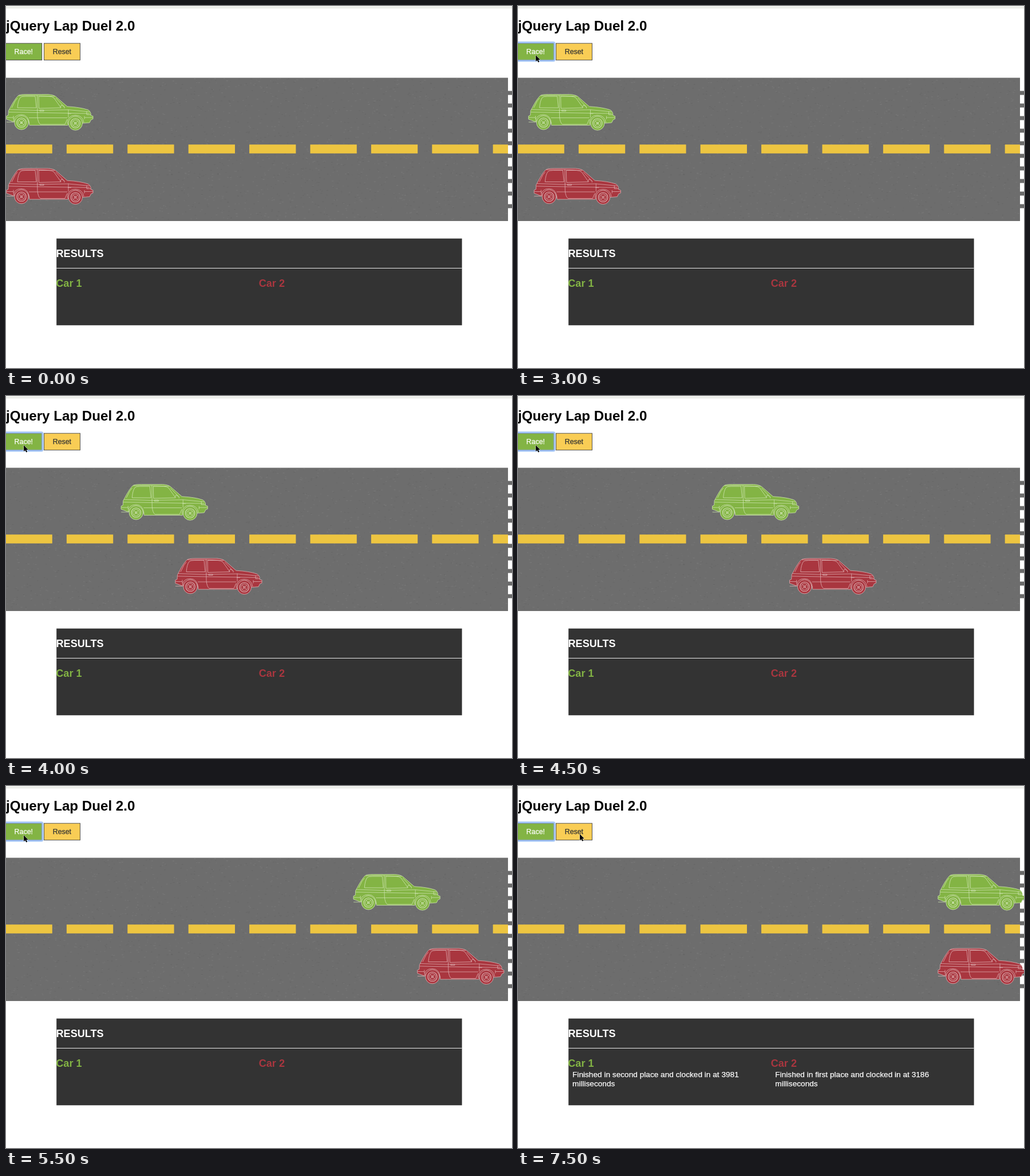
Animation, 884 px wide and 633 px high, one loop 8000 ms. Source, as an HTML page:

```html
<!DOCTYPE html>
<html lang="en">
<head>
<meta charset="utf-8">
<title>jQuery Lap Duel 2.0</title>
<style>
  html, body { margin: 0; width: 100%; height: 100%; overflow: hidden; background: #fff; }
  svg { display: block; width: 884px; height: 633px; }
  text { font-family: "Liberation Sans", Arial, Helvetica, sans-serif; }
  .title { font-size: 24.15px; font-weight: bold; }
  .btn { font-size: 12.4px; stroke-width: .25px; }
  .head { font-size: 18.1px; font-weight: bold; }
  .info { font-size: 13.67px; fill: #fff; stroke: #fff; stroke-width: .25px; }
  .green { --paint: #83b444; --line: #cfe4b2; }
  .red { --paint: #a9363f; --line: #dfb0b3; }
  .head.green, .head.red { fill: var(--paint); }
</style>
</head>
<body>
<svg viewBox="0 0 884 633">
  <defs>
    <g id="wheel">
      <circle r="12.2" fill="var(--paint)"/>
      <circle r="8.2" stroke-width="1.1"/>
      <circle r="5.8"/>
      <circle r="1.8"/>
      <path d="M-4-4 4 4M-4 4 4-4" stroke-width=".8"/>
    </g>
    <g id="car" fill="none" stroke="var(--line)" stroke-width=".8" stroke-linejoin="round">
      <path fill="var(--paint)" d="M4.500 183 7 178.500Q15 163 21 157 23 154.500 36 154.500L73 154.500Q82 155 86.500 158L107 175.700Q130 177 143 181.500 148.500 184 148.500 191.500L152 192.500V197.500L148.500 199 146 204 134 205Q131 193 121 193 111 194 108 208.500H41Q39 193 27 192 17 193 14 203L5 199.500 .8 198V192.500L4 191Z"/>
      <path d="M20 178Q21 165 25 160 26.500 158 34 158L51 158 53 178ZM57 158H75Q81 158 84 161L96 178 57.500 179ZM54.500 156 55 194Q56 204 60 207H103L107 198M22 157Q42 155.500 85 158M87 161 102 176.500"/>
      <path d="M6 181 52 182.500 109 181.500 146 185M5 185.500 55 186.500 146 188M1 195H13M40 195.500H107M137 195H152M13 192V198M137 192.500V198M109 181V195M1 203H13" stroke-width=".75"/>
      <path d="M13 202Q14 190 27 190 39 190 41 206M107 206Q108 191 121 191 134 191 136 204M141 184.500V190H148M59 182H66V184H59ZM95 177 97 173 102 176.500V179M108 188H114M10 178 16 166 20 161"/>
      <use href="#wheel" x="27" y="204"/>
      <use href="#wheel" x="121.300" y="205"/>
    </g>
  </defs>

  <rect width="884" height="3" fill="#f2f3f0"/>
  <rect y="3" width="884" height="1" fill="#dfe0dc"/>
  <text class="title" x="0" y="42.500">jQuery Lap Duel 2.0</text>

  <g stroke="#444" stroke-width=".9">
    <rect x="-.5" y="65.200" width="63.200" height="29.400" fill="#83b444"/>
    <rect x="66.500" y="65.200" width="63" height="29.400" fill="#f9cd55"/>
  </g>
  <g id="ring" fill="none" stroke="#a0c4f7">
    <rect x="-6" y="63.800" width="69.800" height="31.900" rx="2" stroke-width="4.400" opacity=".35"/>
    <rect x="-6" y="63.800" width="69.800" height="31.900" rx="2" stroke-width="2.400"/>
  </g>
  <text class="btn" x="14.600" y="84" fill="#fff" stroke="#fff">Race!</text>
  <text class="btn" x="81.700" y="84" fill="#333" stroke="#333">Reset</text>

  <rect y="125.500" width="877" height="250.500" fill="#6d6d6d"/>
  <path id="dark" fill="#000" opacity=".055"/>
  <path id="light" fill="#fff" opacity=".055"/>
  <path d="M-.5 250H877" stroke="#edc541" stroke-width="15.500" stroke-dasharray="81.300 25.100"/>
  <path d="M880.500 148.500V354" stroke="#6b6b6b" stroke-width="7" stroke-dasharray="7 15"/>

  <rect x="88.200" y="406.600" width="708.400" height="151.700" fill="#333"/>
  <rect x="88.200" y="458.100" width="708.400" height=".9" fill="#fff"/>
  <text class="head" x="87.500" y="438.500" fill="#fff">RESULTS</text>
  <text class="head green" x="87.300" y="491">Car 1</text>
  <text class="head red" x="441.700" y="491">Car 2</text>
  <g class="info" id="info1">
    <text x="95" y="508.500">Finished in second place and clocked in at 3981</text>
    <text x="95" y="524.500">milliseconds</text>
  </g>
  <g class="info" id="info2">
    <text x="449.300" y="508.500">Finished in first place and clocked in at 3186</text>
    <text x="449.300" y="524.500">milliseconds</text>
  </g>

  <use class="green" id="car1" href="#car"/>
  <use class="red" id="car2" href="#car" y="129.500"/>
  <path id="cursor" d="M0 0V11L2.500 8.700 4.300 12.600 6.200 11.800 4.500 8H7.800Z" fill="#000" stroke="#fff" stroke-width=".9" paint-order="stroke"/>
</svg>
<script>
const $ = id => document.getElementById(id);
const LOOP = 8000, TICK = 250, START = 2606, TRACK = 733, FOCUS = 2500;
const cars = [{ id: 1, time: 3981 }, { id: 2, time: 3186 }];

// time, x, y of the pointer tip
const path = [
  [750, 245, 3], [1000, 110, 47], [1250, 25, 78], [1500, 28, 79],
  [1750, 28, 79], [2500, 31, 86], [6250, 31, 86], [6750, 95, 84], [7000, 108, 84]
];

let seed = 7;
const rand = () => (seed = seed * 16807 % 2147483647) / 2147483647;

function speckle(id, count) {
  let d = "";
  for (let i = 0; i < count; i++) {
    const x = rand() * 873, y = 126 + rand() * 247, w = 1 + rand() * 2.5;
    d += `M${x.toFixed(1)} ${y.toFixed(1)}h${w.toFixed(1)}v1.3h-${w.toFixed(1)}z`;
  }
  $(id).setAttribute("d", d);
}

const show = (id, on) => $(id).setAttribute("visibility", on ? "visible" : "hidden");
const move = (id, x, y) => $(id).setAttribute("transform", `translate(${x} ${y})`);
const swing = p => 0.5 - Math.cos(p * Math.PI) / 2;

function pointer(t) {
  const i = path.findIndex(k => k[0] > t);
  if (i < 0) return path[path.length - 1].slice(1);
  if (i === 0) return path[0].slice(1);
  const [a, b] = [path[i - 1], path[i]];
  const p = (t - a[0]) / (b[0] - a[0]);
  return [a[1] + (b[1] - a[1]) * p, a[2] + (b[2] - a[2]) * p];
}

function draw(now) {
  const t = Math.floor(now % LOOP / TICK) * TICK;
  for (const { id, time } of cars) {
    const p = Math.min(1, Math.max(0, (t - START) / time));
    move("car" + id, TRACK * swing(p), 0);
    show("info" + id, p === 1);
  }
  show("ring", t >= FOCUS);
  show("cursor", t >= path[0][0]);
  move("cursor", ...pointer(t));
}

speckle("dark", 1300);
speckle("light", 1300);
const begin = performance.now();
function loop() {
  draw(performance.now() - begin);
  requestAnimationFrame(loop);
}
loop();
</script>
</body>
</html>
```
